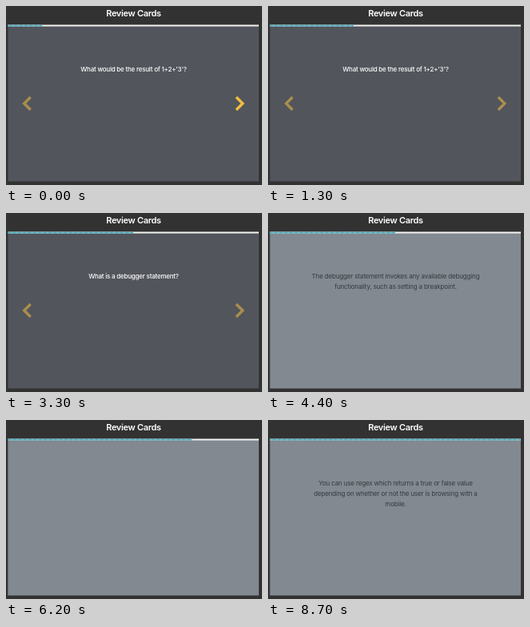
Animation, 320 px wide and 224 px high, one loop 8.8 s. Source, as an HTML page:

```html
<!DOCTYPE html>
<html lang="en">
<head>
<meta charset="utf-8">
<title>Review Cards</title>
<style>
  html, body { margin: 0; width: 100%; height: 100%; overflow: hidden; background: #323232; }
  svg { display: block; width: 320px; height: 224px; }
  text { font: 8px Inter, "Open Sans", sans-serif; letter-spacing: -.16px; text-anchor: middle; fill: #fff; }
  .title { font-size: 11px; font-weight: 600; letter-spacing: -.32px; }
  #question { font-weight: 500; letter-spacing: -.22px; }
  #answer text { fill: #373a3f; }
  .arrow { fill: none; stroke: #f2bd42; stroke-width: 3.4; opacity: .55; }
</style>
</head>
<body>
<svg viewBox="0 0 320 224">
  <defs>
    <pattern id="stripes" width="6.4" height="2" patternUnits="userSpaceOnUse">
      <path fill="#3fa8b9" d="M0 0h6.4v2H0z"/>
      <path fill="#73b5c1" d="M2 0h3l-2 2H0z"/>
    </pattern>
  </defs>
  <path fill="#323232" d="M0 0h320v224H0z"/>
  <text class="title" x="159.5" y="13">Review Cards</text>
  <path fill="#52555c" d="M2.5 25h313.5v194.5H2.5z"/>
  <text id="question" x="159.5" y="82"></text>
  <path class="arrow" d="M30.700 114l-8 8 8 8"/>
  <path class="arrow" id="next" d="M287.800 114l8 8-8 8"/>
  <g id="answer">
    <path fill="#828990" d="M2.5 25h313.5v194.5H2.5z"/>
    <text x="159.5" y="82"></text>
    <text x="159.5" y="95"></text>
    <text x="159.5" y="108"></text>
  </g>
  <path fill="#f4f4f2" d="M2.5 23.600h313.5v2H2.5z"/>
  <rect id="bar" x="2.5" y="23.6" height="2" fill="url(#stripes)"/>
</svg>
<script>
const LOOP = 8800, BAR = 313, CARDS = 6;
const $ = id => document.getElementById(id);
const clamp = v => Math.max(0, Math.min(1, v));

const debuggerAnswer = [
  'The debugger statement invokes any available debugging',
  'functionality, such as setting a breakpoint.'
];
const mobileAnswer = [
  'You can use regex which returns a true or false value',
  'depending on whether or not the user is browsing with a',
  'mobile.'
];
const questions = [
  [0, "What would be the result of 1+2+'3'?"],
  [2640, 'What is a debugger statement?'],
  [4568, 'What is the purpose of breakpoints in debugging?'],
  [6050, 'Can I use reserved words as identifiers?']
];
// start, end, lines
const answers = [
  [100, 700, []],
  [2640, 3000, debuggerAnswer],
  [3900, 4568, debuggerAnswer],
  [4568, 4750, []],
  [6050, 6450, []],
  [8050, 9200, mobileAnswer]
];
const steps = [-306, 616, 2640, 4568, 6050, 8050];
const hovers = [[-500, 616], [1500, 2640], [5200, 6050], [7000, 8050]];

// The CSS "ease" curve
function ease(x) {
  const bezier = (s, a, b) => 3 * (1 - s) ** 2 * s * a + 3 * (1 - s) * s * s * b + s ** 3;
  let lo = 0, hi = 1;
  for (let i = 0; i < 20; i++) {
    const mid = (lo + hi) / 2;
    if (bezier(mid, .25, .25) < x) lo = mid; else hi = mid;
  }
  return bezier(hi, .1, 1);
}

function setText(node, text) {
  if (node.textContent !== text) node.textContent = text;
}

function draw(t) {
  setText($('question'), questions.filter(q => q[0] <= t).pop()[1]);

  const done = steps.reduce((sum, s) => sum + (t > s ? ease(clamp((t - s) / 600)) : 0), 0);
  $('bar').setAttribute('width', BAR * done / CARDS);
  $('stripes').setAttribute('patternTransform', `translate(${-6.4 * t / 1000} 23.6)`);

  const hover = Math.max(...hovers.map(([a, b]) =>
    Math.min(clamp((t - a) / 150), clamp((b + 150 - t) / 150))));
  $('next').style.opacity = .55 + .45 * hover;

  const shown = answers.filter(a => a[0] <= t).pop();
  $('answer').style.opacity = shown ? clamp((shown[1] + 200 - t) / 200) : 0;
  $('answer').querySelectorAll('text').forEach((line, i) =>
    setText(line, shown && shown[2][i] || ''));
}

function frame() {
  draw(performance.now() % LOOP);
  requestAnimationFrame(frame);
}
frame();
</script>
</body>
</html>
```
